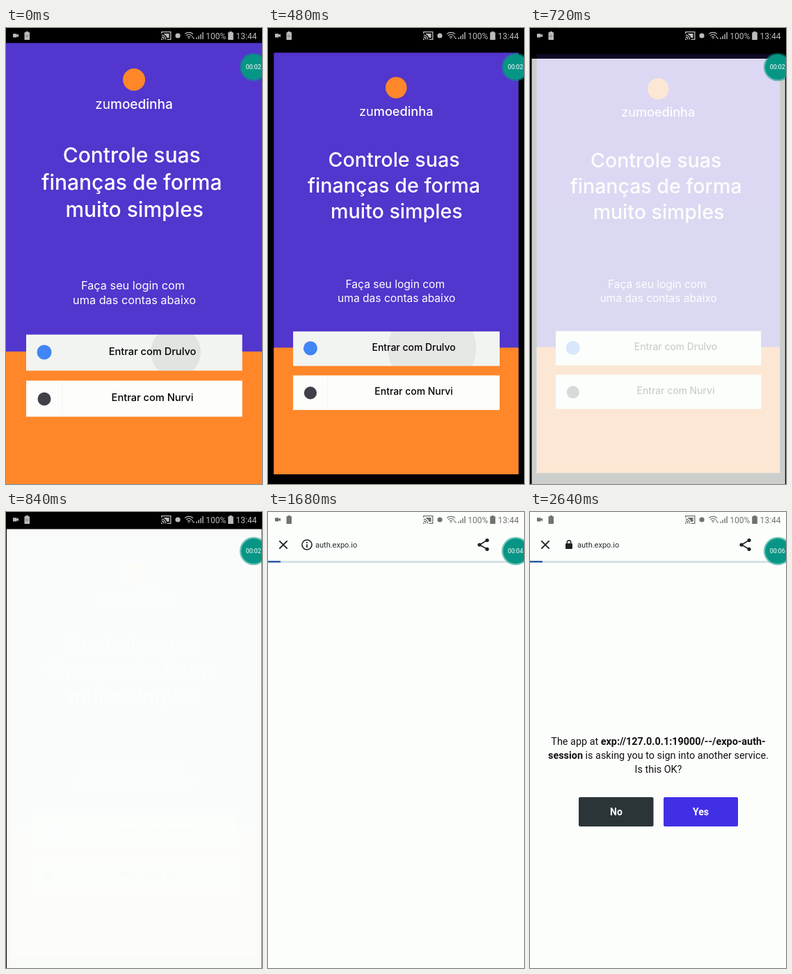
Write an HTML page that moves like this. It is 368 by 654 pixels and loops after 2.76 s.

```html
<!DOCTYPE html>
<html lang="pt">
<head>
<meta charset="utf-8">
<title>Login</title>
<style>
html, body { margin: 0; width: 100%; height: 100%; overflow: hidden; background: #000; }
svg { display: block; width: 100%; height: 100%; }
.app { font-family: Inter, "Open Sans", sans-serif; fill: #fff; text-anchor: middle; }
.title { font-size: 30px; font-weight: 500; }
.hint { font-size: 16.3px; }
.entry { font-size: 14.6px; font-weight: 500; fill: #000; }
.web, #status, #timer { font-family: Roboto, "Liberation Sans", sans-serif; }
.ask { font-size: 14.4px; text-anchor: middle; fill: #111; }
.choice { font-size: 14px; font-weight: 700; text-anchor: middle; fill: #fff; }
.b { font-weight: 700; }
.line { fill: none; stroke: currentColor; }
</style>
</head>
<body>
<svg viewBox="0 0 368 654">
  <defs>
    <clipPath id="entryClip"><rect x="29" y="439.7" width="310.6" height="51.8"/></clipPath>
  </defs>
  <rect width="368" height="654"/>

  <g id="app" class="app">
    <rect y="21.5" width="368" height="632.5" fill="#5236cd"/>
    <rect y="464" width="368" height="190" fill="#ff872a"/>
    <circle cx="184" cy="74" r="16" fill="#ff872a"/>
    <text x="184" y="116" font-size="19">zu<tspan font-weight="500">moedinha</tspan></text>
    <g class="title">
      <text x="180.7" y="192.5">Controle suas</text>
      <text x="180.7" y="231.5">finanças de forma</text>
      <text x="184.7" y="270.5">muito simples</text>
    </g>
    <g class="hint">
      <text x="182.5" y="374.5">Faça seu login com</text>
      <text x="184.5" y="395.5">uma das contas abaixo</text>
    </g>
    <rect id="entryBg" x="29" y="439.7" width="310.6" height="51.8"/>
    <g clip-path="url(#entryClip)"><circle id="ripple" cy="465" fill="#000"/></g>
    <circle cx="55" cy="465" r="10.5" fill="#4285f4"/>
    <text class="entry" x="210.5" y="469">Entrar com Drulvo</text>
    <rect x="29" y="505.7" width="310.6" height="51.8" fill="#fdfefc"/>
    <path d="M81 506V557.5" stroke="#f1f2f1"/>
    <circle cx="55" cy="532" r="9.5" fill="#3f4048"/>
    <text class="entry" x="210.5" y="535">Entrar com Nurvi</text>
  </g>

  <g id="tab" class="web">
    <rect width="368" height="22" id="tabTop"/>
    <rect y="21" width="368" height="660" fill="#fcfefc"/>
    <g id="bar" color="#202124">
      <path class="line" stroke-width="1.9" d="M16.3 41.3L27.7 52.7M27.7 41.3L16.3 52.7"/>
      <g id="info">
        <circle class="line" stroke-width="1.6" cx="56" cy="47" r="7"/>
        <path class="line" stroke-width="1.7" d="M56 43V44.7M56 46.2V51"/>
      </g>
      <g id="lock">
        <rect x="51" y="45" width="10" height="8" rx="1.2" fill="currentColor"/>
        <path class="line" stroke-width="1.5" d="M53.3 45.5V43.4A2.7 2.7 0 0 1 58.7 43.4V45.5"/>
      </g>
      <text x="68" y="51" font-size="11" fill="#2b2c2e">auth.expo.io</text>
      <path class="line" stroke-width="1.6" d="M315 40.5L304 47L315 53.3"/>
      <g fill="currentColor">
        <circle cx="315" cy="40.5" r="2.6"/><circle cx="304" cy="47" r="2.6"/><circle cx="315" cy="53.3" r="2.6"/>
      </g>
      <rect y="72" width="368" height="1" fill="#dcdedc"/>
      <rect id="track" y="70" width="368" height="3" fill="#d6e0e6"/>
      <rect id="load" y="70" height="2.4" fill="#2c5aa3"/>
    </g>
    <g id="page">
      <g class="ask">
        <text x="184.5" y="334">The app at <tspan class="b">exp://127.0.0.1:19000/--/expo-auth-</tspan></text>
        <text x="184.5" y="354"><tspan class="b">session</tspan> is asking you to sign into another service.</text>
        <text x="184.5" y="374">Is this OK?</text>
      </g>
      <rect x="70" y="409" width="107.5" height="42" rx="2" fill="#2b3538"/>
      <rect id="yes" x="192" y="409" width="107" height="42" rx="2"/>
      <text class="choice" x="124" y="435">No</text>
      <text class="choice" x="245.5" y="435">Yes</text>
    </g>
  </g>

  <g id="status" fill="currentColor" font-size="12">
    <path d="M10 8.2H15.5V10L18 8.5V13.2L15.5 11.7V13.5H10Z"/>
    <path d="M28.5 5H32V6.3H34V17H26.5V6.3H28.5Z"/>
    <path d="M28 10.5H32.5M28 12.5H32.5" stroke="#777" stroke-width=".8"/>
    <path class="line" stroke-width="1.3" d="M223.7 8V5.7H236.8V16.3H231.5M223.7 10.2A6.2 6.2 0 0 1 229.7 16.4M223.7 13A3.5 3.5 0 0 1 227 16.4"/>
    <path d="M223 17V15A2 2 0 0 1 225 17ZM227 8H234.5V14H231.5A8 8 0 0 0 227 9Z"/>
    <circle cx="247" cy="11" r="3.6"/>
    <path class="line" stroke-width="1.2" d="M257 8.6A9 9 0 0 1 269 8.6M259 11A6 6 0 0 1 267 11M261 13.3A3 3 0 0 1 265 13.3"/>
    <path d="M261.8 14.2H264.2L263 16ZM266.5 13.5L268 11.5L269.5 13.5ZM268.3 14L269.7 16L271.2 14Z"/>
    <path class="line" stroke-width="1.4" d="M274 16V13.5M277 16V11.2M280 16V8.7M283 16V6"/>
    <text x="287.3" y="16">100%</text>
    <path d="M321.3 5H324.7V6.3H326.8V17H319.2V6.3H321.3Z"/>
    <text x="330.5" y="16">13:44</text>
  </g>

  <g id="timer">
    <circle cx="356" cy="56" r="20.2" fill="#079685" fill-opacity=".55"/>
    <circle cx="356" cy="56" r="18" fill="#079685"/>
    <text id="clock" x="344.8" y="59" font-size="8.8" fill="#fff"></text>
  </g>
</svg>
<script>
const STEP = 120, LOOP = 2760;
const $ = id => document.getElementById(id);
const set = (id, attrs) => {
  for (const k in attrs) $(id).setAttribute(k, attrs[k]);
};
const show = (id, on) => set(id, { display: on ? "inline" : "none" });

// Linear interpolation through [time, value] points, held at both ends
function track(points, t) {
  if (t <= points[0][0]) return points[0][1];
  for (let i = 1; i < points.length; i++) {
    const [t0, a] = points[i - 1], [t1, b] = points[i];
    if (t <= t1) return a + (b - a) * (t - t0) / (t1 - t0);
  }
  return points[points.length - 1][1];
}

const shrink = [[120, 1], [240, .992], [360, .972], [480, .956], [600, .951], [720, .95]];
const rippleR = [[0, 36], [480, 66], [600, 90]];
const rippleA = [[0, .065], [360, .065], [480, .055], [600, .025], [720, 0]];
const tabAlpha = [[480, 0], [600, .25], [720, .81], [840, .99], [960, 1]];
const tabDrop = [[600, 56], [720, 23], [840, 3.5], [960, 0]];
const tabScale = [[600, .975], [720, .99], [840, .996], [960, 1]];
const firstLoad = [[1560, 0], [1680, 18], [1800, 120], [1920, 260], [2040, 368]];
const ticks = [[0, 2], [960, 3], [1320, 4], [1800, 5], [2400, 6]];

const around = (x, y, sx, sy) =>
  `translate(${x} ${y}) scale(${sx} ${sy}) translate(${-x} ${-y})`;

function render(t) {
  const s = track(shrink, t);
  set("app", { transform: around(190, 337.5, s, s) });
  set("ripple", { cx: track([[0, 244], [480, 238]], t), r: track(rippleR, t), "fill-opacity": track(rippleA, t) });
  set("entryBg", { fill: t < 600 ? "#f2f4f2" : "#fdfefc" });

  set("tab", {
    opacity: track(tabAlpha, t),
    transform: `translate(0 ${track(tabDrop, t)}) ` + around(250, 0, track(tabScale, t), 1)
  });
  const light = t >= 1080;
  set("tabTop", { fill: light ? "#fcfefc" : "#000" });
  set("status", { color: light ? "#707270" : "#bcbcbc" });

  const reload = t >= 2520;
  show("bar", t >= 960);
  show("info", t < 1800);
  show("lock", t >= 1800);
  show("track", t >= 1200 && t < 2160 || reload);
  show("load", t >= 1680 && t < 2160 || t >= 2640);
  set("load", { width: reload ? 18 : track(firstLoad, t) });
  show("page", t >= 2040);
  set("yes", { fill: t >= 2280 && t < 2520 ? "#3727c4" : "#412fe6" });

  $("clock").textContent = "00:0" + ticks.filter(p => p[0] <= t).pop()[1];
}

const start = performance.now();
function loop() {
  const t = (performance.now() - start) % LOOP;
  render(Math.floor(t / STEP) * STEP);
  requestAnimationFrame(loop);
}
loop();
</script>
</body>
</html>
```
